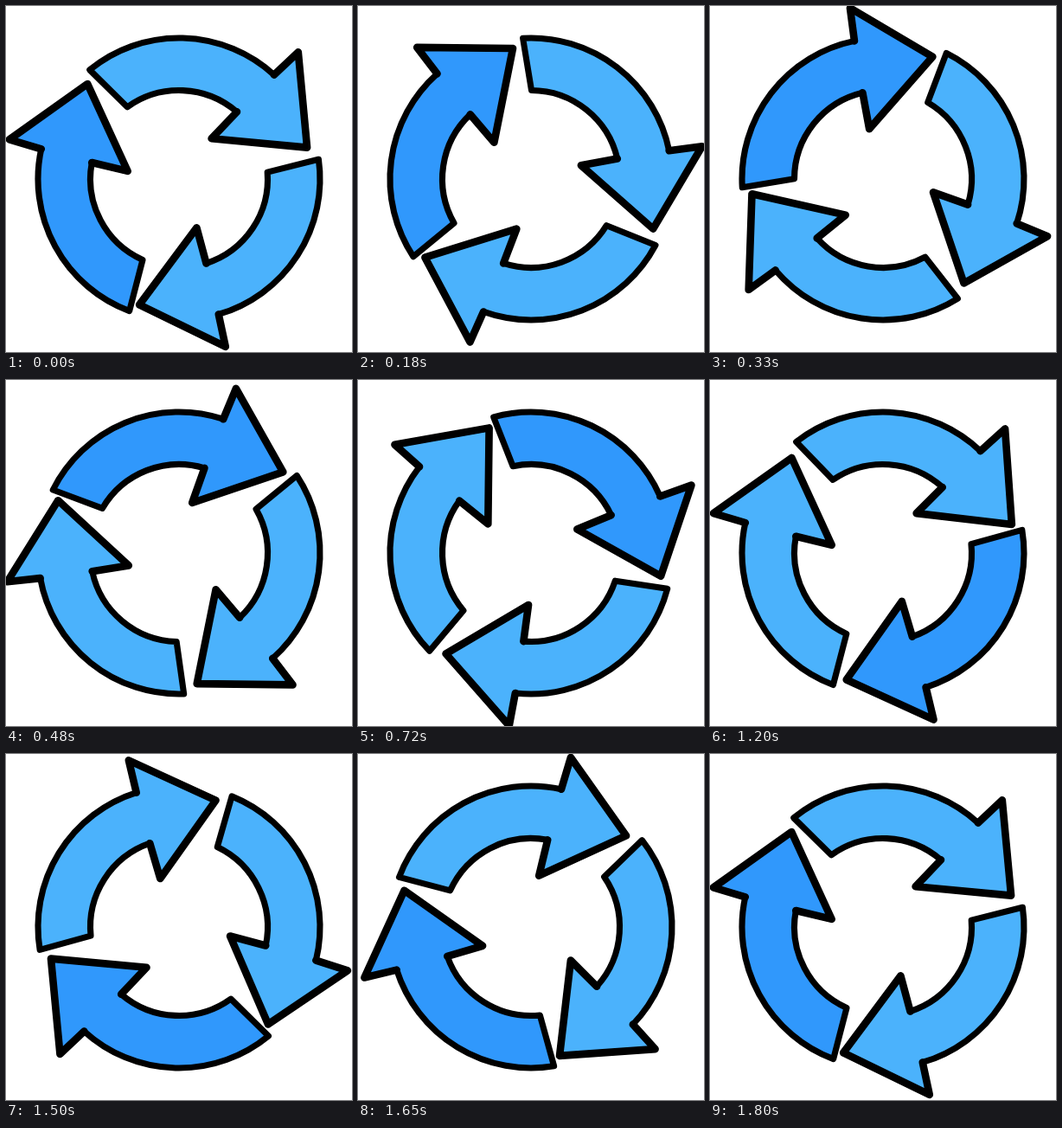
These frames come from a looping animation (400 by 400 pixels, 1.83 s). An HTML page with a canvas:

```html
<!DOCTYPE html>
<html lang="en">
<head>
<meta charset="utf-8">
<title>Cycle arrows</title>
<style>
  html, body { margin: 0; width: 100%; height: 100%; overflow: hidden; background: #fff; }
  canvas { display: block; width: 400px; height: 400px; }
</style>
</head>
<body>
<canvas id="stage" width="400" height="400"></canvas>
<script>
const ctx = document.getElementById('stage').getContext('2d');
const LOOP = 1830, STEP = 30, TURN = 6;
const OUTER = 163, INNER = 102.5;
const BODY_LINE = 7.1, HEAD_LINE = 8.6;
const LIGHT = '#4bb2fc', DARK = '#3098fc';
const arrows = [[0, DARK], [120.1, LIGHT], [241.4, LIGHT]];

const rad = deg => deg * Math.PI / 180;

function polar(path, r, deg) {
  path.lineTo(r * Math.cos(rad(deg)), r * Math.sin(rad(deg)));
}

// Arrowhead outline, from the inner neck round the tip to the outer neck
function addHead(path) {
  polar(path, INNER, 190.7);
  polar(path, 60, 188.7);
  polar(path, 152.5, 226.1);
  polar(path, 201.3, 193.1);
  polar(path, OUTER, 192.3);
}

// One curved arrow around the origin, pointing clockwise
function makeArrow() {
  const p = new Path2D();
  addHead(p);
  p.arc(0, 0, OUTER, rad(192.3), rad(110.6), true);
  p.arc(0, 0, INNER, rad(114.2), rad(190.7));
  p.closePath();
  return p;
}

const arrow = makeArrow();
const head = new Path2D();
addHead(head);

function outline(path, width) {
  ctx.lineWidth = width;
  ctx.stroke(path);
}

function draw(now) {
  const angle = Math.floor((now % LOOP) / STEP) * TURN;
  ctx.setTransform(1, 0, 0, 1, 0, 0);
  ctx.fillStyle = '#fff';
  ctx.fillRect(0, 0, 400, 400);
  ctx.lineJoin = ctx.lineCap = 'round';
  ctx.strokeStyle = '#000';
  for (const [offset, color] of arrows) {
    ctx.setTransform(1, 0, 0, 1, 200, 200);
    ctx.rotate(rad(angle + offset));
    ctx.fillStyle = color;
    ctx.fill(arrow);
    outline(arrow, BODY_LINE);
    outline(head, HEAD_LINE);
  }
}

const start = performance.now();

function tick() {
  draw(performance.now() - start);
  requestAnimationFrame(tick);
}

tick();
</script>
</body>
</html>
```
